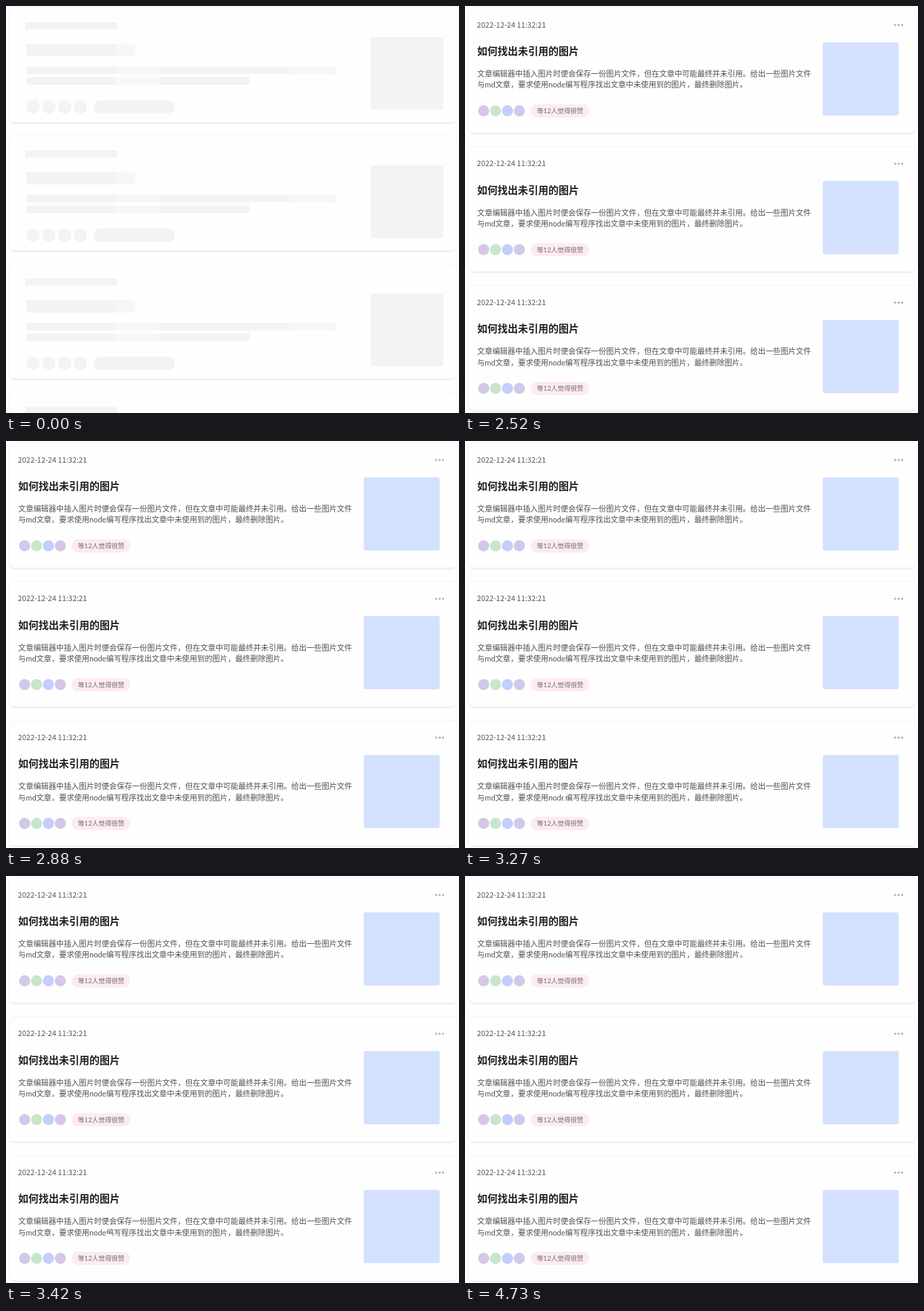
These frames come from a looping animation (668 by 600 pixels, 5.51 s). An HTML page:

```html
<!DOCTYPE html>
<html lang="zh-CN">
<head>
<meta charset="utf-8">
<style>
  html, body { margin: 0; width: 100%; height: 100%; overflow: hidden; background: #fefefe; }
  svg { display: block; width: 668px; height: 600px; }
  text { font-family: Lato, "Noto Sans CJK SC", "Noto Sans CJK", sans-serif; white-space: pre; }
  .date { font: 11px "Noto Sans CJK SC", "Noto Sans CJK", sans-serif; fill: #555; }
  .title { font-size: 15px; font-weight: 700; fill: #202124; }
  .body { font-size: 11.2px; fill: #505050; }
  .tag { font-size: 9.6px; fill: #707070; }
  .bone { fill: #f2f3f4; }
  .sheen { fill: #f6f8f7; }
</style>
</head>
<body>
<svg viewBox="0 0 668 600">
  <g id="loading"></g>
  <g id="loaded"></g>
  <path id="arrow" d="M104.6 444.2v14.6l3.3-3.1 2.3 5.1 2.3-1-2.2-5h4.7z" fill="#000" stroke="#fff" stroke-width=".9"/>
  <g id="beam" fill="none" stroke-linecap="square">
    <path id="beamShape" d="M-3.2-7.5h1.6q1.6 0 1.6 1.6V5.9q0 1.6-1.6 1.6h-1.6M3.2-7.5H1.6Q0-7.5 0-5.9V5.9Q0 7.5 1.6 7.5h1.6M-1.5 2.5h3" stroke="#fff" stroke-width="2.4"/>
    <use href="#beamShape" style="stroke:#000"/>
  </g>
</svg>
<script>
const LOOP = 5510;
const byId = id => document.getElementById(id);
const rect = (x, y, w, h, attrs) => `<rect x="${x}" y="${y}" width="${w}" height="${h}" ${attrs}/>`;
const circle = (x, y, r, attrs) => `<circle cx="${x}" cy="${y}" r="${r}" ${attrs}/>`;
const text = (x, y, kind, value) => `<text x="${x}" y="${y}" class="${kind}">${value}</text>`;
const bone = (x, y, w, h, r = 0) => rect(x, y, w, h, `rx="${r}" class="bone"`);
const sheen = (x, y, w, h) => rect(x, y, w, h, 'class="sheen"');

// Card surface with a thin crescent of shadow along its lower edge.
const surface = height =>
  rect(5, 4.5, 660, height, 'rx="8" fill="#efefef"') +
  rect(4.5, 2.5, 661, height - .5, 'rx="7" fill="#fefefe" stroke="#f3f3f3"');

const skeletonCard = surface(169.5) +
  bone(29, 24, 136, 10.5) + sheen(162, 24, 3, 10.5) +
  bone(30, 55.7, 160, 18.6) + sheen(162, 55.7, 28, 18.6) +
  bone(30, 89.2, 456, 11, 1) + sheen(162, 89.2, 64, 11) + sheen(418, 89.2, 64, 11) +
  bone(30, 105, 329, 11, 1) + sheen(162, 105, 64, 11) +
  [40, 63, 86.5, 109.5].map(x => circle(x, 148.5, 10, 'class="bone"')).join('') +
  bone(129, 139, 120, 19.3, 9.6) +
  rect(538, 46, 107, 107, 'fill="#f1f3f4"');

const avatars = ['#d3c8e9', '#c8e6cc', '#c5cdfd', '#d3c8e9'];
const articleCard = surface(185) +
  text(17.6, 31.6, 'date', '2022-12-24 11:32:21') +
  [634.3, 639.4, 644.5].map(x => circle(x, 28, 1.7, 'fill="#bababa"')).join('') +
  text(18, 72.3, 'title', '如何找出未引用的图片') +
  text(18, 104.2, 'body', '文章编辑器中插入图片时便会保存一份图片文件，但在文章中可能最终并未引用。给出一些图片文件') +
  text(18, 120.4, 'body', '与md文章，要求使用node编写程序找出文章中未使用到的图片，最终删除图片。') +
  avatars.map((color, i) => circle(27.5 + 17.55 * i, 154.5, 8.2, `fill="${color}"`)).join('') +
  rect(96.8, 144.8, 86.6, 19.6, 'rx="9.8" fill="#feebef"') +
  text(106, 158.1, 'tag', '等12人觉得很赞') +
  rect(527.5, 53.5, 112, 108, 'rx="3" fill="#d3e1fe"');

const stack = (card, count, pitch) =>
  Array.from({ length: count }, (_, i) => `<g transform="translate(0 ${pitch * i})">${card}</g>`).join('');

byId('loading').innerHTML = stack(skeletonCard, 4, 188.9);
byId('loaded').innerHTML = stack(articleCard, 3, 204.6);

const show = (id, visible) => { byId(id).style.display = visible ? '' : 'none'; };

function draw(now) {
  const t = now % LOOP;
  show('loading', t < 2520);
  show('loaded', t >= 2520);
  show('arrow', t >= 3120 && t < 3270);
  show('beam', t >= 3270 && t < 3560);
  byId('beam').setAttribute('transform', t < 3420 ? 'translate(146.5 529.5)' : 'translate(152.5 536.5)');
}

const start = performance.now();
function tick() {
  draw(performance.now() - start);
  requestAnimationFrame(tick);
}
tick();
</script>
</body>
</html>
```
